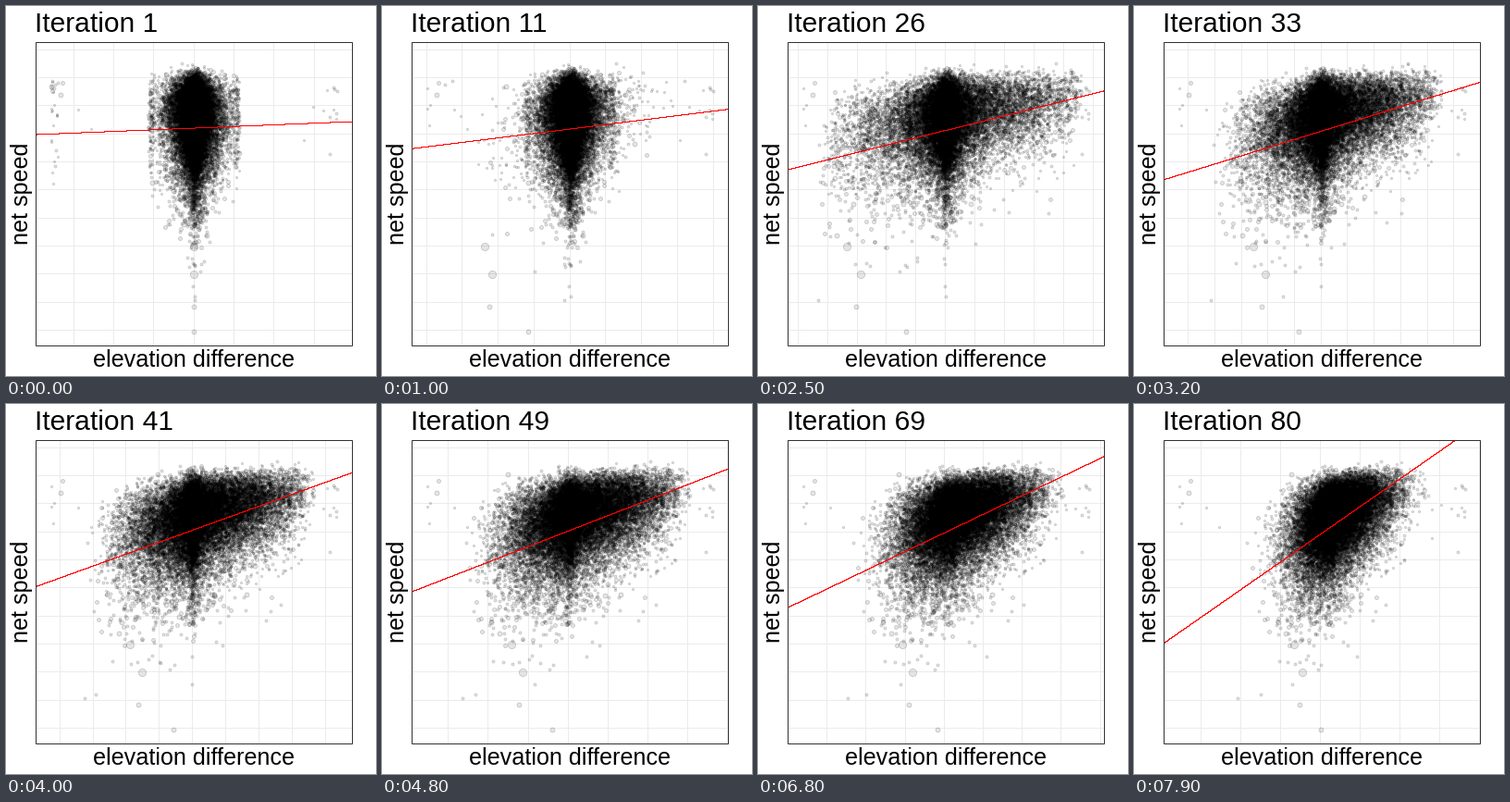
These frames come from a looping animation (400 by 400 pixels, 8 s). A matplotlib script:

```python
import numpy as np
import matplotlib.pyplot as plt
from matplotlib.animation import FuncAnimation
from matplotlib.patches import Rectangle

FRAMES, INTERVAL = 80, 100
LEFT, RIGHT, TOP, BOTTOM = 32, 374, 39, 367
N = 20000
PX = 0.72  # points per pixel at 100 dpi

plt.rcParams["font.family"] = "Liberation Sans"
rng = np.random.default_rng(7)


def ramp(t, t0, t1, a, b):
    """Move evenly from a at t0 to b at t1."""
    return np.interp(t, [t0, t1], [a, b])


def zero(t):
    return ramp(t, 18, 48, 203.2, 201.2)


def grid_step(t):
    return np.interp(t, [0, 32, 48, 59, 68, 79],
                     [43.3, 28.7, 43.1, 49.3, 42.2, 43])


def tilt(t):
    """Half the rise of the fitted line across the panel."""
    return np.interp(t, [0, 32, 68, 79], [7, 52.7, 81.7, 119]) \
        + 2.5 * np.sin(np.pi * ramp(t, 32, 68, 0, 2)) * (t < 50)


def spread(t):
    return np.interp(t, [0, 18, 32, 68, 79], [125, 110, 57, 39, 28])


class Cloud:
    """Points that leave the zero line one by one and settle in a bell."""

    def __init__(self):
        y = 60 + rng.gamma(5, 13, N) + rng.normal(0, 2, N)
        y += (rng.random(N) < 0.012) * rng.exponential(45, N)
        self.y = y = np.minimum(np.sort(y)[::-1], 318)

        # Faster points tend to settle further right
        z = 0.42 * np.sort(rng.normal(size=N)) + 0.91 * rng.normal(size=N)
        self.z = z * (0.9 + 0.12 * np.abs(z))

        core = np.where(rng.random(N) < 0.07, rng.normal(0, 3, N),
                        rng.laplace(0, 1, N))
        edge = 5.8 - 0.5 * rng.random(N)
        self.core = np.clip(core, -edge, edge) \
            * np.clip((320 - y) / 120, 0.15, 1)

        self.leave = 6 + rng.gamma(3, 8, N)
        self.size = np.minimum(1.9 + rng.exponential(0.75, N)
                               + (y > 205) * 0.8, 5.5)

        # Large slow points at the bottom
        big = ((352, 5, -0.7), (325, 5, -1.8), (289.5, 7, -1.65),
               (260, 9, -2.1))
        for i, (py, size, pz) in enumerate(big):
            self.y[i], self.size[i], self.z[i] = py, size, pz
            self.core[i], self.leave[i] = 0, 8

        # Early outliers on the left, then lone points that stay far out
        early, west, east = np.split(rng.choice(np.arange(10, N), 42, False),
                                     [22, 30])
        self.core[early] = -18.2 + rng.random(22) ** 1.5
        self.leave[early] = 8
        self.y[early] = rng.uniform(80, 195, 22)
        self.fixed = np.r_[west, east]
        self.fixed_x = np.r_[47.5 + 45 * rng.random(8) ** 2,
                             358.5 - 38 * rng.random(12) ** 1.5]
        self.y[self.fixed] = rng.uniform(80, 160, 20)

    def x(self, t):
        width = 3.6 + 4.9 / (1 + np.exp((t - 32) / 5))
        held = self.core * width
        reach = ramp(t, 18, 32, 158, 128)
        left = ramp(t, 18, 32, 0.92, 0.78)
        z = np.where(self.z < 0, left, 1) * self.z
        free = 0.2 * t + reach * np.tanh(z * spread(t) / reach)
        free = np.minimum(free, 155)
        mix = np.clip((t - self.leave) / 12 + 0.5, 0, 1)
        x = zero(t) + held + mix * (free - held)
        x[self.fixed] = self.fixed_x
        return x


cloud = Cloud()

fig = plt.figure(figsize=(4, 4), dpi=100, facecolor="white")
ax = fig.add_axes([0, 0, 1, 1])
ax.set_xlim(0, 400)
ax.set_ylim(400, 0)
ax.axis("off")

panel = Rectangle((LEFT, TOP), RIGHT - LEFT, BOTTOM - TOP,
                  fill=False, ec="#333333", lw=PX, zorder=5)
ax.add_patch(panel)


def rule(xs, ys, color, **kw):
    line, = ax.plot(xs, ys, color=color, lw=PX, **kw)
    line.set_clip_path(panel)
    return line


for i in range(11):
    gy = np.floor(47.3 + 30.3 * i)
    rule([LEFT, RIGHT], [gy, gy], "#ebebeb", zorder=1)
STEPS = np.arange(-6, 7)
columns = [rule([0, 0], [TOP, BOTTOM], "#ebebeb", zorder=1) for _ in STEPS]

# One marker set per diameter keeps drawing fast
groups = []
kind = np.searchsorted([2.6, 3.5, 4.6, 6], cloud.size)
for k, d in enumerate((2.2, 3, 4, 5, 8.3)):
    dots, = ax.plot([], [], "o", ms=d * PX, mew=0.9 * PX, zorder=2,
                    mfc=(0, 0, 0, 0.1), mec=(0, 0, 0, 0.17))
    groups.append((dots, np.flatnonzero(kind == k)))

# Whole-pixel steps give the fitted line its hard edge
fit_x = np.arange(LEFT, RIGHT + 1)
fit = rule(fit_x, 0 * fit_x, "#ff0000", zorder=4, drawstyle="steps-post")

title = ax.text(30.8, 28.4, "", size=30 * PX, va="baseline")
ax.text(203, 390, "elevation difference", size=25.1 * PX, ha="center",
        va="baseline")
ax.text(29, 202.8, "net speed", size=25.1 * PX, rotation=90, ha="right",
        va="center")


def draw(t):
    title.set_text(f"Iteration {t + 1}")
    for n, line in zip(STEPS, columns):
        gx = np.floor(zero(t) + n * grid_step(t))
        line.set_xdata([gx, gx])
    x = cloud.x(t)
    for dots, pick in groups:
        dots.set_data(x[pick], cloud.y[pick])
    across = (fit_x - 203) / 171
    fit.set_ydata(np.floor(132 + 0.09 * t - tilt(t) * across))
    return []


anim = FuncAnimation(fig, draw, frames=FRAMES, interval=INTERVAL,
                     repeat=True, repeat_delay=0, blit=False)
plt.show()
```
